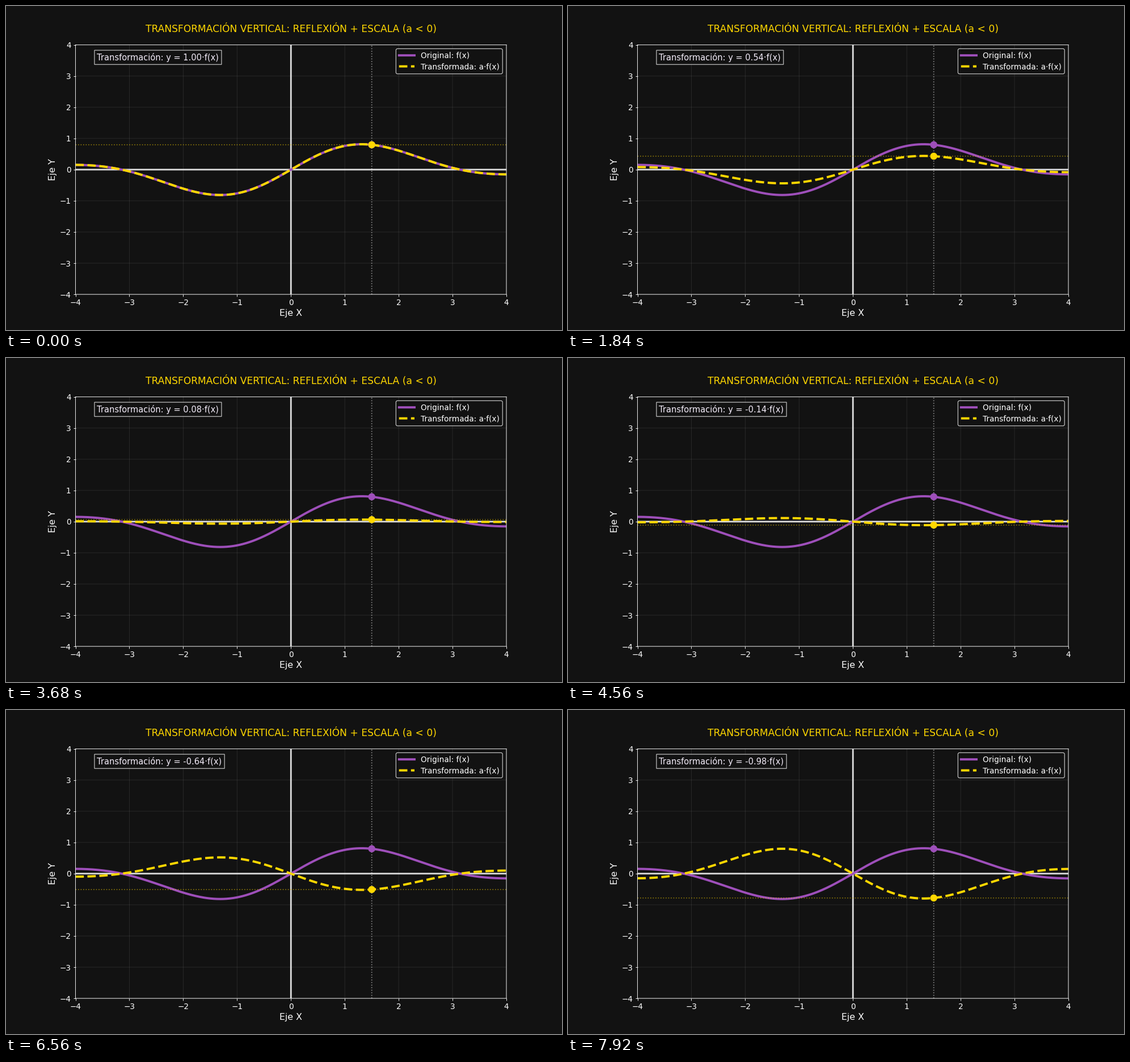
Recreate the animation shown at these times as a matplotlib script. Size 980 by 572 pixels, loop 8000 ms.

```python
import numpy as np
import matplotlib.pyplot as plt
from matplotlib.animation import FuncAnimation

FRAMES, INTERVAL = 100, 80
BACK, PURPLE, GOLD = "#121212", "#9e4fba", "#ffd700"
DPI = 980 / 12
POINT_X = 1.5

plt.rcParams.update({
    "font.family": "DejaVu Sans",
    "font.size": 12,
    "path.snap": False,
    "text.color": "white",
    "axes.edgecolor": "white",
    "axes.labelcolor": "white",
    "xtick.color": "white",
    "ytick.color": "white",
})


def f(x):
    return np.sin(x) * np.exp(-0.1 * x**2)


fig, ax = plt.subplots(figsize=(980 / DPI, 572 / DPI), dpi=DPI, facecolor=BACK)
ax.set_facecolor(BACK)
ax.set(xlim=(-4, 4), ylim=(-4, 4), xticks=range(-4, 5), yticks=range(-4, 5))
ax.set_title("TRANSFORMACIÓN VERTICAL: REFLEXIÓN + ESCALA (a < 0)",
             color=GOLD, fontsize=15.08, pad=20)
ax.set_xlabel("Eje X", fontsize=14, labelpad=3.3)
ax.set_ylabel("Eje Y", fontsize=14)
ax.grid(color="white", alpha=0.1, linewidth=0.8)

for draw_axis in (ax.axhline, ax.axvline):
    draw_axis(0, color="white", linewidth=2.5, alpha=0.85)

x = np.linspace(-4, 4, 400)
ax.plot(x, f(x), color=PURPLE, linewidth=3.5, label="Original: f(x)")
scaled, = ax.plot(x, f(x), "--", color=GOLD, linewidth=3.5,
                  label="Transformada: a·f(x)")

dotted = dict(linestyle=":", linewidth=1.5, alpha=0.5)
ax.axvline(POINT_X, color="white", **dotted)
level = ax.axhline(f(POINT_X), color=GOLD, **dotted)

dots = ax.scatter([POINT_X] * 2, [f(POINT_X)] * 2, s=100, c=[PURPLE, GOLD],
                  zorder=5)

formula = ax.text(0.05, 0.95, "", transform=ax.transAxes, fontsize=12.93,
                  color="#f3ecf9", va="center",
                  bbox=dict(facecolor=BACK, edgecolor="white", alpha=0.8))
ax.legend(loc="upper right", fontsize=12, facecolor=BACK, edgecolor="white",
          framealpha=0.8, labelspacing=0.4)


def update(frame):
    a = 1 - frame / 50
    y = a * f(POINT_X)
    scaled.set_ydata(a * f(x))
    level.set_ydata([y, y])
    dots.set_offsets([(POINT_X, f(POINT_X)), (POINT_X, y)])
    formula.set_text(f"Transformación: y = {a:.2f}·f(x)")
    return scaled, level, dots, formula


anim = FuncAnimation(fig, update, frames=FRAMES, interval=INTERVAL,
                     repeat=True, repeat_delay=0)
plt.show()
```
